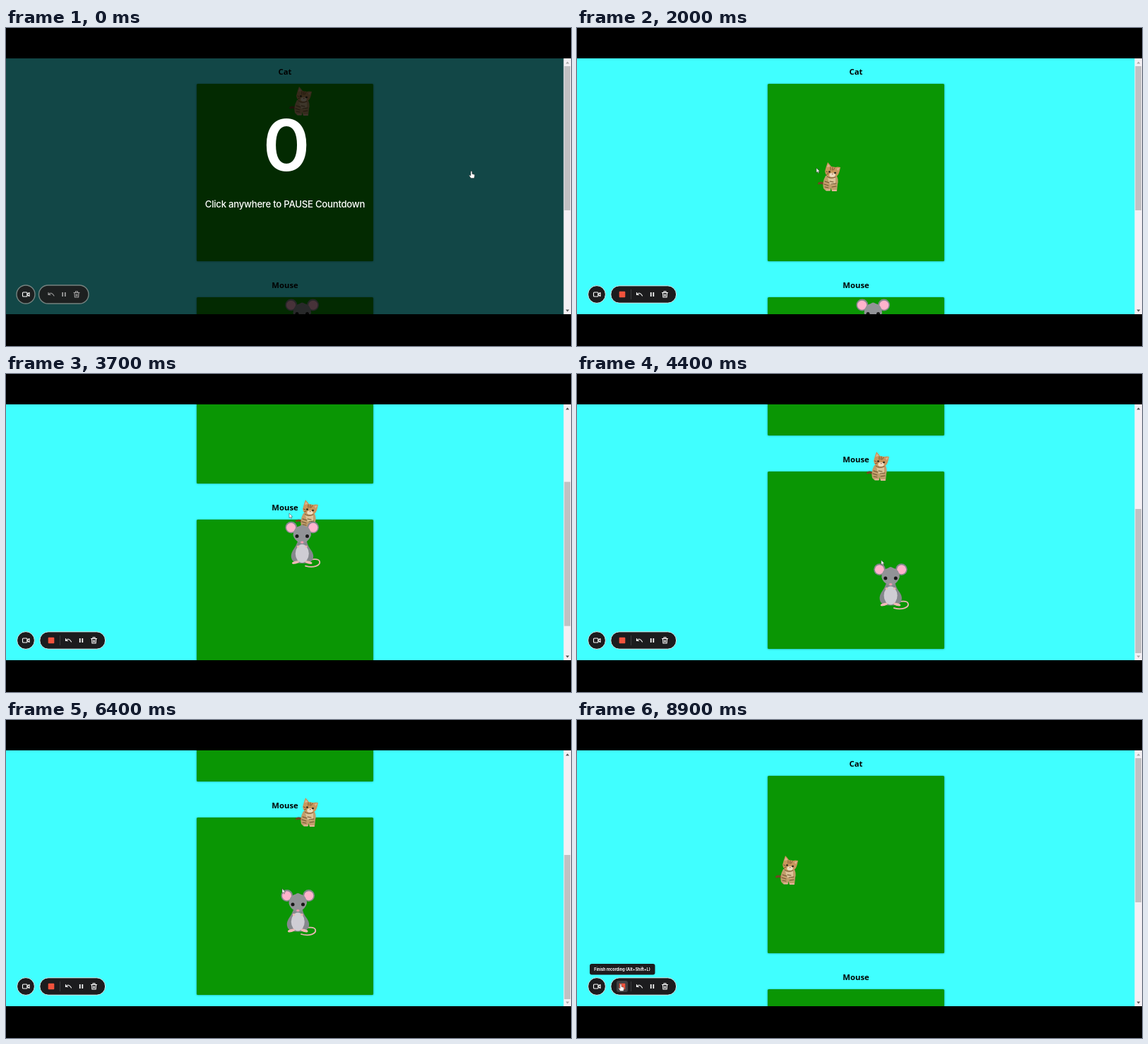
Recreate the animation shown at these times as an HTML page. Size 800 px wide and 450 px high, loop 9.3 s.

```html
<!DOCTYPE html>
<html lang="en">
<head>
<meta charset="utf-8">
<title>Cat and Mouse</title>
<style>
html, body { margin: 0; width: 100%; height: 100%; overflow: hidden; background: #000; }
svg { display: block; width: 100vw; height: 100vh; }
text { text-anchor: middle; }
.title { font: 700 11.3px "Open Sans", "Noto Sans", sans-serif; }
.overlay text, .tip text { font-family: Inter, Lato, sans-serif; fill: #fff; }
.line { fill: none; stroke-linecap: round; stroke-linejoin: round; }
</style>
</head>
<body>
<svg viewBox="0 0 800 450">
  <defs>
    <clipPath id="view"><rect y="43" width="790" height="362"/></clipPath>
    <clipPath id="field"><rect width="522" height="800"/></clipPath>
    <filter id="soft" x="-5%" y="-5%" width="110%" height="110%"><feGaussianBlur stdDeviation="1"/></filter>

    <g id="box">
      <rect x="269.5" width="251" height="251.5" rx="2" fill="#065" opacity=".5" filter="url(#soft)"/>
      <rect x="270" width="250" height="251" rx="1.5" fill="#0a9604"/>
    </g>

    <g id="catArt">
      <path class="line" d="M12 34Q6 27 1.5 30" stroke="#6f4722" stroke-width="3"/>
      <path d="M11 19Q6 28 8 37L11 40H18V36L20 41H27L28 31Q30 24 26 18Z" fill="#c19d6b"/>
      <path d="M14 22Q19 25 25 21V30Q20 34 16 30Z" fill="#dcc298"/>
      <path class="line" d="M10 27L16 29M9 31L15 33M10 35L15 36M17 27L22 28M19 31L26 30M20 35L26 34" stroke="#6f5430" stroke-width="1.1"/>
      <path d="M10 13Q12 5 14 0Q17 3 19 6L25 7Q28 6 32 7Q31 12 30 15Q28 21 21 22Q11 21 10 13Z" fill="#c8965c"/>
      <path d="M13 7L14.5 2.5L17.5 6ZM26.5 9L31 7.8L28.5 12Z" fill="#e0b392"/>
      <path class="line" d="M18 7V11M21 7L20.5 11M24 8L22 11M11.5 13L14 14M12.5 17L15 16" stroke="#795430"/>
      <ellipse cx="20.5" cy="18" rx="4.3" ry="2.9" fill="#eddcc0"/>
      <ellipse cx="16.5" cy="13.5" rx="1.5" ry="1.3" fill="#2c2b1f"/>
      <ellipse cx="24.5" cy="15" rx="1.5" ry="1.3" fill="#2c2b1f"/>
      <path d="M19.6 16H22L20.7 17.5Z" fill="#a95746"/>
      <path class="line" d="M13 20Q18 24 25 21" stroke="#735837"/>
      <path d="M11.5 38.5H17.5V40.5H11.5ZM20 39H26.5V41H20Z" fill="#e7b49c"/>
    </g>

    <g id="mouseArt">
      <path class="line" d="M28 63.5C39 67 50 63 48 57C46 52 40 55 36 54" stroke="#e9b6b4" stroke-width="1.8"/>
      <g fill="#85888d">
        <circle cx="7.8" cy="9" r="8.4"/><circle cx="38.6" cy="9" r="8.4"/>
        <path d="M17 29Q15 35 10 42Q6 49 9 55Q12 60 23.3 60Q35 60 38 55Q41 49 36.5 42Q31 35 30 29Z"/>
      </g>
      <circle cx="7.6" cy="9.2" r="6.5" fill="#ffb3cc"/>
      <circle cx="38.8" cy="9.2" r="6.5" fill="#ffb3cc"/>
      <ellipse cx="23.3" cy="46" rx="9.5" ry="13" fill="#cfcdd4"/>
      <path d="M20 7Q23 4 27 7Q36 9 36 20Q34 27 27 31Q23.3 34 20 31Q12 27 10.5 20Q11 9 20 7Z" fill="#929397"/>
      <circle cx="16" cy="21.5" r="2.5" fill="#171717"/><circle cx="30.5" cy="21.5" r="2.5" fill="#171717"/>
      <ellipse cx="23.3" cy="30" rx="2.2" ry="1.6" fill="#ef9caf"/>
      <circle cx="17.5" cy="36" r="1.7" fill="#e9b6b4"/><circle cx="29" cy="36" r="1.7" fill="#e9b6b4"/>
      <ellipse cx="14" cy="58.5" rx="5.2" ry="2" fill="#efb9b7" transform="rotate(-14 14 58.5)"/>
      <ellipse cx="32.5" cy="58.5" rx="5.2" ry="2" fill="#efb9b7" transform="rotate(14 32.5 58.5)"/>
    </g>

    <g id="camera" class="line" stroke-width="1.1">
      <rect x="23.5" y="374" width="6.5" height="6" rx="1"/><path d="M30 376.5L33 374.5V379.5L30 377.5"/>
    </g>
    <g id="tools" class="line" stroke-width="1.1">
      <path d="M-4 374.5V377.5H-1M-4 377.3Q0 372.5 4 379"/>
      <path d="M16.2 374V380M19.8 374V380" stroke-width="1.7" stroke-linecap="butt"/>
      <path d="M32 374.5H40M34.5 374.3V372.8H37.5V374.3M33 375L33.4 381H38.6L39 375M35.2 376.8V379.2M36.8 376.8V379.2"/>
    </g>
  </defs>

  <rect width="800" height="450"/>
  <g clip-path="url(#view)">
    <rect y="43" width="790" height="362" fill="#40ffff"/>
    <g id="page">
      <text class="title" x="395" y="66.3">Cat</text>
      <use href="#box" y="79"/>
      <text class="title" x="395" y="368.2">Mouse</text>
      <use href="#box" y="381"/>
      <g clip-path="url(#field)"><use href="#catArt" id="cat"/></g>
      <use href="#mouseArt" id="mouse"/>
    </g>
    <g id="overlay" class="overlay">
      <rect y="43" width="790" height="362" opacity=".72"/>
      <text x="397" y="202" font-size="101" font-weight="600">0</text>
      <text x="395" y="254" font-size="13.2" font-weight="500" letter-spacing="-.02em">Click anywhere to PAUSE Countdown</text>
    </g>
  </g>

  <rect x="789.5" y="43" width="10.5" height="362" fill="#f4f0f4"/>
  <rect id="thumb" x="790.5" y="54" width="8.5" height="204" fill="#c1c0c2"/>
  <path id="up" d="M792.5 50.5L795 47.5L797.5 50.5Z"/>
  <path id="down" d="M792.5 398.5L795 401.5L797.5 398.5Z"/>

  <g id="waiting" fill="#1d2020" stroke="#75827f" stroke-width="1.4">
    <circle cx="28" cy="377" r="13"/>
    <rect x="46.5" y="364" width="70.5" height="26" rx="13"/>
    <use href="#camera" stroke="#fff"/>
    <use href="#tools" x="64" stroke="#a4a4a4"/>
  </g>
  <g id="recording" fill="#1c1c1e" stroke="#d5f7f7">
    <circle cx="28" cy="377" r="12.4"/>
    <rect x="47.8" y="364.8" width="92.8" height="24.4" rx="12.2"/>
    <rect id="hover" x="56" y="369" width="16" height="16" rx="3" fill="#414143" stroke="none"/>
    <rect x="59.7" y="372.7" width="8.6" height="8.6" rx="1" fill="#f1533c" stroke="none"/>
    <path d="M76.5 370V384" stroke="#3d3d3f"/>
    <use href="#camera" stroke="#fff"/>
    <use href="#tools" x="88.5" stroke="#fff"/>
  </g>
  <g id="tip" class="tip">
    <rect x="18" y="345" width="92.5" height="15.5" rx="3" fill="#1c1c1e"/>
    <text x="64" y="354.6" font-size="5.5" font-weight="700">Finish recording (Alt+Shift+L)</text>
  </g>

  <path id="arrow" d="M0 0V6.6L1.5 5.3L2.6 7.6L3.7 7.1L2.7 4.9H4.7Z" fill="#fff" stroke="#333" stroke-width=".5"/>
  <path id="hand" d="M-1 0Q0 -1 1 0V3.5L4 4.2Q4.8 4.5 4.6 6L3.8 9.5H-.8L-3.3 5.8Q-2.9 4.6 -1 6Z" fill="#fff" stroke="#333" stroke-width=".5"/>
</svg>
<script>
const LOOP = 9300, STEP = 100, MAX_SCROLL = 243;
const $ = id => document.getElementById(id);

// Smooth progress from 0 to 1 between two times.
function ease(t, from, to) {
  const p = Math.min(1, Math.max(0, (t - from) / (to - from)));
  return p * p * (3 - 2 * p);
}

// A point that starts somewhere and glides to each stop in turn.
const glide = (t, start, ...moves) => moves.reduce(([x, y], [from, to, tx, ty]) => {
  const p = ease(t, from, to);
  return [x + (tx - x) * p, y + (ty - y) * p];
}, start);

const add = ([x, y], [dx, dy]) => [x + dx, y + dy];

const scrollAt = t => MAX_SCROLL * (ease(t, 3140, 4000) - ease(t, 6500, 6900));

const catAt = t => glide(t, [401, 83],
  [300, 800, 494, 140], [800, 2000, 341, 190], [2000, 2900, 410, 353], [7100, 7700, 281, 192]);

// The mouse swings round on its first drag, then settles.
function mouseAt(t) {
  const p = ease(t, 3700, 5200);
  const swing = [70 * Math.sin(2 * Math.PI * p), 100 * Math.sin(Math.PI * p)];
  return add(glide(t, [396, 383], [3700, 5200, 403, 447], [5200, 6400, 390, 482.5]), swing);
}

// The pointer holds whichever animal is being dragged.
function cursorAt(t) {
  const onPage = ([x, y]) => [x, y - scrollAt(t)];
  if (t < 800) return glide(t, [659, 203], [0, 800, 477, 136]);
  if (t < 2900) return add(catAt(t), glide(t, [-17, -4], [800, 2000, -2, 8]));
  if (t < 3700) return glide(t, [408, 361], [2900, 3300, 401, 197]);
  if (t < 6500) return add(onPage(mouseAt(t)), glide(t, [5, -11], [3700, 5200, 16, 4], [5200, 6400, 1, -1]));
  if (t < 7100) return glide(t, [391, 239], [6500, 7000, 412, 361]);
  return glide(t, add(catAt(t), [2, 8]), [7700, 8400, 62, 374]);
}

const place = (id, [x, y]) => $(id).setAttribute("transform", `translate(${x} ${y})`);
const show = (id, on) => $(id).setAttribute("display", on ? "inline" : "none");
const paint = (id, active) => $(id).setAttribute("fill", active ? "#505050" : "#a8a8a8");

function draw(t) {
  const counting = t < 100, onStop = t >= 8400, pointing = counting || onStop;
  const scroll = scrollAt(t);

  place("page", [0, -scroll]);
  place("thumb", [0, scroll * 137 / MAX_SCROLL]);
  paint("up", scroll > 0);
  paint("down", scroll < MAX_SCROLL);
  place("cat", catAt(t));
  place("mouse", mouseAt(t));

  show("overlay", counting);
  show("waiting", counting);
  show("recording", !counting);
  show("hover", onStop);
  show("tip", t >= 8600);
  show("hand", pointing);
  show("arrow", !pointing);
  place(pointing ? "hand" : "arrow", cursorAt(t));
}

function tick() {
  draw(Math.floor(performance.now() % LOOP / STEP) * STEP);
  requestAnimationFrame(tick);
}
tick();
</script>
</body>
</html>
```
